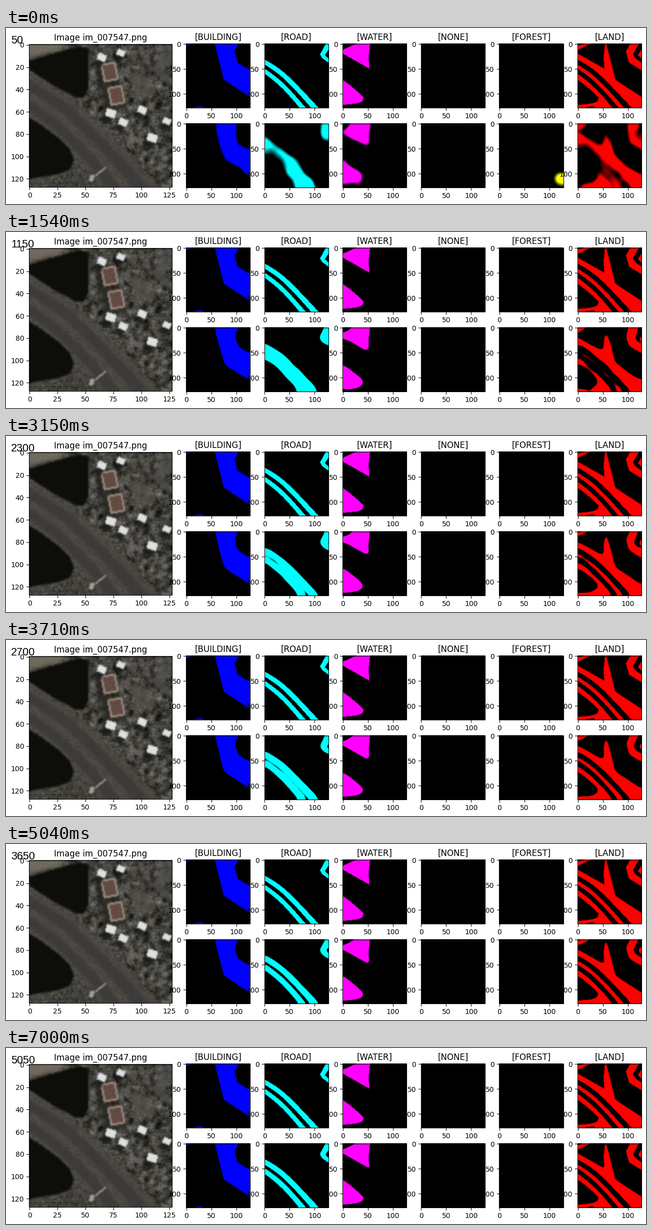
Write a matplotlib script that moves like this. It is 1280 px wide and 353 px high and loops after 7.07 s.

```python
import numpy as np
import matplotlib.pyplot as plt
from matplotlib.animation import FuncAnimation
from matplotlib.patches import Rectangle
from matplotlib.path import Path

W, H, N, FRAMES = 1280, 353, 128, 101
PT = 100 / 72

yy, xx = np.mgrid[0:N, 0:N] + 0.5
GRID = np.column_stack([xx.ravel(), yy.ravel()])


def poly(*v):
    return Path(np.reshape(v, (-1, 2))).contains_points(GRID).reshape(N, N)


def disc(x, y, r):
    return np.hypot(xx - x, yy - y) < r


def box(x, y, w, h, tilt=0.35):
    """Slightly turned rectangle, as seen from above."""
    c, s = np.cos(tilt), np.sin(tilt)
    u, v = c * (xx - x) + s * (yy - y), c * (yy - y) - s * (xx - x)
    return (abs(u) < w / 2) & (abs(v) < h / 2)


def blur(f, sigma):
    k = np.exp(-0.5 * ((yy - yy.T) / sigma) ** 2)
    k /= k.sum(axis=1, keepdims=True)
    return k @ f @ k.T


def mottle(rng, sigma):
    f = blur(rng.standard_normal((N, N)), sigma)
    return (f - f.mean()) / f.std()


def lane(top, bottom):
    """Strip of the curving road between two edges, given at the left border."""
    def edge(c):
        bow = 0.3 * (np.hypot(xx - 35, 25) - np.hypot(35, 25))
        return c + (0.8 + 0.0065 * (c - 32)) * xx + bow
    return (yy > edge(top)) & (yy < edge(bottom))


# Labelled masks
lanes = lane(32, 42) | lane(50, 60)
bend = poly(122, 0, 110, 22, 115, 30, 128, 39, 128, 31, 120, 23, 128, 11, 128, 0)
building = (poly(57, 0, 105, 0, 96, 16, 102, 38, 128, 54, 128, 107, 75, 72)
            | poly(0, 0, 13, 0, 0, 5) | poly(13, 128, 20, 126, 33, 125, 35, 128))
road = lanes | bend
water = (poly(0, 13, 28, 0, 55, 0, 52, 25, 53, 50, 0, 20)
         | poly(0, 72, 15, 83, 35, 100, 42, 108, 40, 115, 30, 119, 15, 121, 0, 122))
empty = np.zeros((N, N), bool)

CLASSES = {"BUILDING": (0, 0, 1), "ROAD": (0, 1, 1), "WATER": (1, 0, 1),
           "NONE": (1, 1, 1), "FOREST": (1, 1, 0), "LAND": (1, 0, 0)}
truth = dict(BUILDING=building, ROAD=road, WATER=water, NONE=empty, FOREST=empty,
             LAND=~(building | road | water))
learned = dict(truth, FOREST=disc(121, 110, 7))
del learned["NONE"]


def predict(name, i):
    """The label seen through a blur that sharpens, with a wobble that dies down."""
    t = i / (FRAMES - 1)
    sigma = 7 - 5 * t
    level = {"ROAD": 0.39, "FOREST": 0.2 + 0.035 * i}.get(name, 0.5)
    shake = 0.07 * np.exp(-i / 8) + 0.04 * (1 - t)
    if name == "FOREST":
        shake = 0
    rng = np.random.default_rng([i, len(name)])
    p = blur(learned[name], sigma) + shake * mottle(rng, 9)
    edge = 0.8 + 3 * np.exp(-i / 6)
    return np.clip(0.5 + (p - level) * 2.5 * sigma / edge, 0, 1)


def aerial():
    rng = np.random.default_rng(7)
    img = np.full((N, N, 3), (67, 65, 59), float)
    town = blur(lane(-90, 26), 3)
    img += (9 * mottle(rng, 0.6) + 16 * town * mottle(rng, 1.6))[..., None]

    def paint(color, mask, soft=0.6, alpha=1):
        a = alpha * blur(mask, soft)[..., None]
        img[:] = img * (1 - a) + np.array(color) * a

    paint((112, 107, 95), poly(0, 0, 35, 0, 22, 7, 0, 12), 1.5)
    paint((78, 75, 68), lane(26, 64), 1, 0.6)
    paint((58, 56, 57), lanes, 1, 0.8)
    for pond in (poly(0, 15, 20, 9, 45, 2, 53, 4, 53, 40, 49, 48, 42, 48, 20, 36, 0, 23),
                 poly(0, 66, 10, 72, 25, 83, 36, 93, 40, 103, 37, 112, 28, 116, 0, 121)):
        paint((82, 78, 69), pond, 3, 0.5)
        paint((13, 13, 10), pond, 0.8)
    paint((92, 87, 78), poly(85, 22, 108, 30, 112, 45, 100, 50, 92, 35), 2, 0.7)
    paint((84, 82, 80), bend, 1, 0.7)
    for x, y in ((72, 25), (78, 46)):
        paint((34, 34, 30), box(x - 2, y + 2, 19, 22, -0.2), 1, 0.8)
        paint((150, 132, 122), box(x, y, 14, 17, -0.2))
        paint((96, 74, 66), box(x, y, 10, 13, -0.2))
    for x, y, size in ((65, 12, 8), (82, 8, 7), (73, 62, 9), (84, 70, 8),
                       (101, 59, 8), (110, 84, 9), (123, 69, 7)):
        paint((28, 29, 27), box(x - 3, y + 4, size, size), 1, 0.8)
        paint((222, 225, 224), box(x, y, size, 0.8 * size))
    paint((160, 158, 152), box(56, 120, 4, 6))
    paint((150, 148, 142), box(64, 114, 12, 1.5, -0.7))
    return np.clip(img / 255, 0, 1)


fig = plt.figure(figsize=(W / 100, H / 100), dpi=100, facecolor="white")
stage = fig.add_axes([0, 0, 1, 1])
plt.rcParams["font.family"] = "DejaVu Sans"


def panel(z, x, y, size, img, xticks, yticks, title=None):
    """One image with frame, ticks and title, in stage pixels."""
    art = stage.imshow(img, extent=(x, x + size, y + size, y), aspect="auto", zorder=z)
    line = dict(color="black", lw=0.8, zorder=z + 0.5)
    stage.add_patch(Rectangle((x, y), size, size, fill=False, ec="black", lw=0.8, zorder=z + 0.5))
    tick, gap, bottom = 3.5 * PT, 7 * PT, y + size
    text = dict(fontsize=10, zorder=z + 0.6)
    for v in xticks:
        p = x + (v + 0.5) * size / N
        stage.plot([p, p], [bottom, bottom + tick], **line)
        stage.text(p, bottom + gap, str(v), ha="center", va="top", **text)
    for v in yticks:
        p = y + (v + 0.5) * size / N
        stage.plot([x, x - tick], [p, p], **line)
        stage.text(x - gap, p, str(v), ha="right", va="center_baseline", **text)
    if title:
        stage.text(x + size / 2, y - 6 * PT, title, ha="center", fontsize=12, zorder=z + 0.6)
    return art


def tint(mask, color):
    return mask[..., None] * np.array(color, float)


panel(1, 46, 32.8, 286.4, aerial(), range(0, 126, 25), range(0, 121, 20), "Image im_007547.png")
ticks = (0, 50, 100)
views = {}
for j, (name, color) in enumerate(CLASSES.items()):
    x = 360 + 156.6 * j
    panel(2 + j, x, 31.8, 128.2, tint(truth[name], color), ticks, ticks, f"[{name}]")
    views[name] = panel(8 + j, x, 191.8, 128.2, tint(empty, color), ticks, ticks)

step = stage.text(10, 31, "", fontsize=15.5, family="Liberation Sans", zorder=20)
stage.set(xlim=(0, W), ylim=(H, 0))
stage.axis("off")


def update(i):
    step.set_text(str(50 * (i + 1)))
    for name in learned:
        views[name].set_data(tint(predict(name, i), CLASSES[name]))
    return [step, *views.values()]


ani = FuncAnimation(fig, update, frames=FRAMES, interval=70, repeat=True, repeat_delay=0)
plt.show()
```
